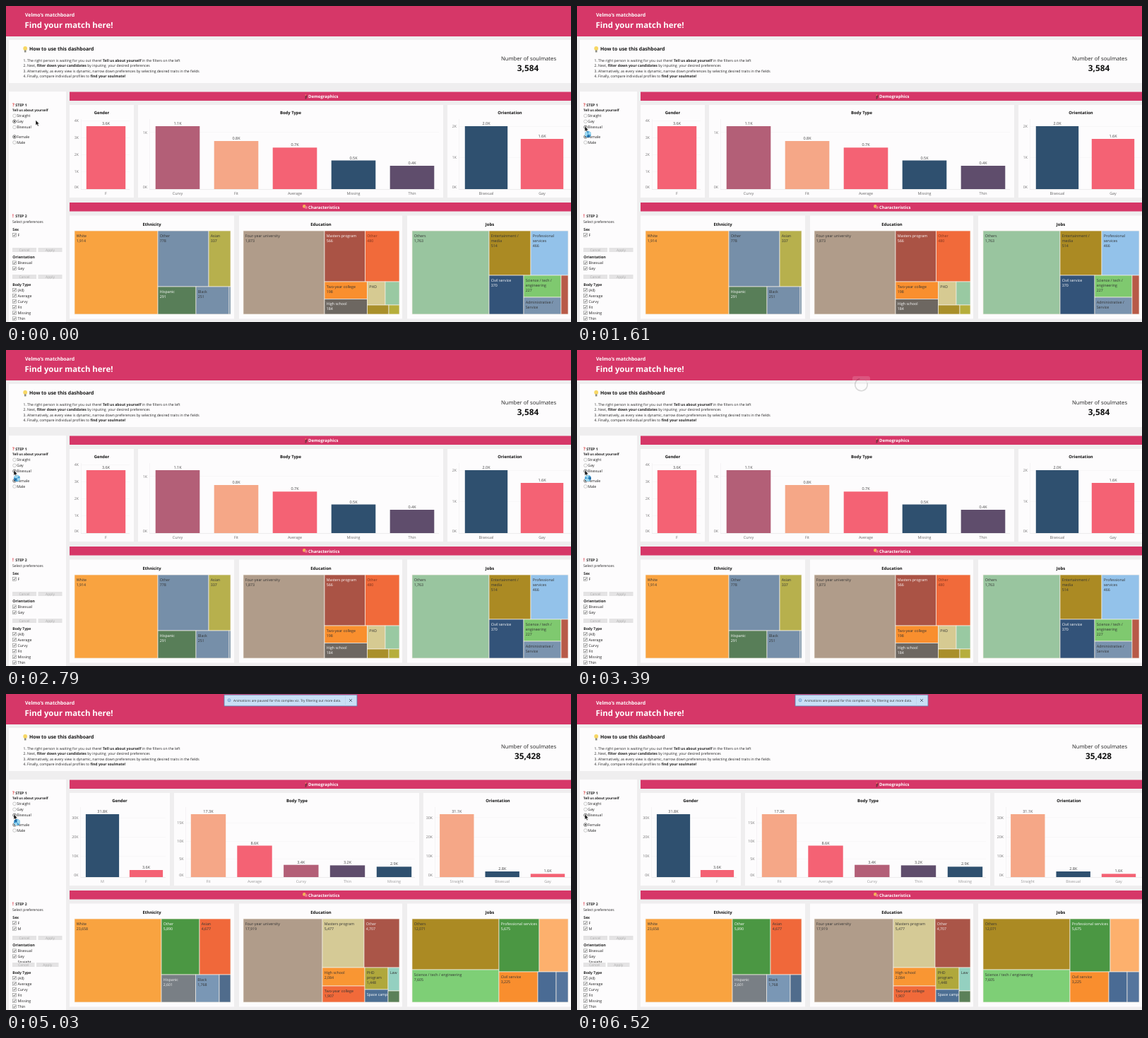
Animation of 800x447 px, one loop 6550 ms. Source, as an HTML page:

```html
<!DOCTYPE html>
<html lang="en">
<head>
<meta charset="utf-8">
<title>Match dashboard</title>
<style>
  html, body { margin: 0; width: 100%; height: 100%; overflow: hidden; background: #eee; }
  svg { display: block; width: 100vw; height: 100vh; }
  text { font-family: "Open Sans", "Noto Sans", sans-serif; text-rendering: geometricPrecision; white-space: pre; }
</style>
</head>
<body>
<svg id="stage" viewBox="0 0 800 447" preserveAspectRatio="none"></svg>
<script>
const LOOP = 6550;
const PINK = '#d63768', PANEL = '#fdfcfd', INK = '#222', GREY = '#666';
const NAVY = '#2f506f', CORAL = '#f46274', PEACH = '#f5a787', MAUVE = '#b35f77', PLUM = '#5f4d6c';

const rect = (x, y, w, h, fill, more = '') =>
  `<rect x="${x}" y="${y}" width="${w}" height="${h}" fill="${fill}" ${more}/>`;
const box = (l, t, r, b, fill, more) => rect(l, t, r - l, b - t, fill, more);
const text = (x, y, s, size, fill = INK, more = '') =>
  `<text x="${x}" y="${y}" font-size="${size}" fill="${fill}" ${more}>${s}</text>`;
const BOLD = 'font-weight="700"', MID = 'text-anchor="middle"', END = 'text-anchor="end"';
const strong = s => `<tspan font-weight="700">${s}</tspan>`;
const group = (id, body, more = '') => `<g id="${id}" ${more}>${body}</g>`;
const title = (x, y, s) => text(x, y, s, 5.9, '#111', `${BOLD} ${MID}`);

// Bars: [centre, top, colour, name, value]; ticks: [y, label]
function barChart(c) {
  let s = box(c.left, 140, c.right, 271, PANEL) + title(c.mid, 152.5, c.name);
  s += box(c.axis + 3, 160, c.axis + 3.5, 259, '#eceaec');
  for (const [y, label] of c.ticks) {
    if (label !== '0K') s += box(c.axis + 3, y, c.right - 6, y + 0.4, '#f0eef0');
    s += text(c.axis, y + 2, label, 5.3, '#777', END);
  }
  s += box(c.axis + 3, 259, c.right - 6, 259.5, '#dddadd');
  for (const [x, top, fill, name, value] of c.bars) {
    s += box(x - c.half, top, x + c.half, 259, fill);
    s += text(x, top - 2, value, 5.5, '#444', MID);
    s += text(x, 267, name, 5.4, c.label, MID);
  }
  return s;
}

// Cells: [left, top, right, bottom, colour, lines, text colour]
function treemap(cells) {
  return cells.map(([l, t, r, b, fill, lines = '', ink = '#333']) =>
    box(l, t, r, b, fill, 'stroke="#f3eee6" stroke-width=".7"') +
    lines.split('|').map((s, i) => text(l + 2.7, t + 8.6 + i * 7, s, 5.3, ink)).join('')
  ).join('');
}

const radio = (y, name) =>
  `<circle cx="12" cy="${y}" r="2.3" fill="#fff" stroke="#aaa" stroke-width=".6"/>` + text(15.3, y + 2, name, 5.3);
const dot = (id, y) =>
  `<g id="${id}"><circle cx="12" cy="${y}" r="2.3" fill="#fff" stroke="#555" stroke-width=".7"/><circle cx="12" cy="${y}" r="1.1" fill="#333"/></g>`;
const check = (y, name) =>
  rect(9.5, y - 2.4, 4.8, 4.8, '#fff', 'stroke="#888" stroke-width=".6"') +
  `<path d="M10.5 ${y}l1.1 1.2 1.9-2.5" fill="none" stroke="#333" stroke-width=".8"/>` +
  text(16.5, y + 2, name, 5.3);
const buttons = (y, w) => ['Cancel', 'Apply'].map((s, i) => {
  const x = 9 + i * (w + 2.5);
  return rect(x, y - 3, w, 6, '#e4e3e4') + text(x + w / 2, y + 1.7, s, 4.9, '#aaa', MID);
}).join('');
const band = (y, s) => box(90, y, 800, y + 12.5, PINK) + text(428, y + 8.7, s, 5.95, '#fff', BOLD);

function frame() {
  let s = rect(0, 0, 800, 447, '#efeeef') + rect(0, 0, 800, 43, PINK);
  s += text(27, 15.3, 'Velmo’s matchboard', 6.9, '#fff', BOLD);
  s += text(26.5, 31, 'Find your match here!', 11.4, '#fff', BOLD);

  s += box(4, 48, 800, 109, PANEL);
  s += '<circle cx="27.2" cy="60" r="2.9" fill="#f7d764"/>' + rect(26, 62.5, 2.5, 3, '#8b8b82');
  s += text(33, 63.4, 'How to use this dashboard', 6.9, '#111', BOLD);
  [
    `1. The right person is waiting for you out there! ${strong('Tell us about yourself')} in the filters on the left`,
    `2. Next, ${strong('filter down your candidates')} by inputing  your desired preferences`,
    '3. Alternatively, as every view is dynamic, narrow down preferences by selecting desired traits in the fields',
    `4. Finally, compare individual profiles to ${strong('find your soulmate!')}`
  ].forEach((line, i) => { s += text(24.5, 79 + i * 7.25, line, 5.1); });
  s += text(740, 76.5, 'Number of soulmates', 7.7, INK, MID);

  s += box(4, 121, 85, 447, PANEL);
  s += text(9, 142, '?', 6.2, '#d93636', BOLD) + text(13.3, 142, 'STEP 1', 5.2, INK, BOLD);
  s += text(9, 149, 'Tell us about yourself', 4.75, INK, BOLD);
  s += radio(155.3, 'Straight') + radio(163.3, 'Gay') + radio(171.4, 'Bisexual');
  s += radio(185, 'Female') + radio(193, 'Male');
  s += dot('gay', 163.3) + dot('bi', 171.4) + dot('female', 185);
  s += text(9, 299.3, '!', 6.4, '#d92d3d', BOLD) + text(13.3, 299.3, 'STEP 2', 5.2, INK, BOLD);
  s += text(9, 307, 'Select preferences', 5.1);
  s += text(9.3, 318, 'Sex', 5.2, INK, BOLD) + check(324, 'F');
  s += text(9.3, 357, 'Orientation', 5.4, INK, BOLD) + check(363.3, 'Bisexual') + check(371.3, 'Gay');
  s += text(9.3, 395.8, 'Body Type', 5.1, INK, BOLD);
  ['(All)', 'Average', 'Curvy', 'Fit', 'Missing', 'Thin'].forEach((n, i) => { s += check(401.7 + i * 8.1, n); });

  s += band(121.5, 'Demographics') + band(278, 'Characteristics');
  s += '<path d="M424 125l2.5 2-1.3 4.5h-1.8z" fill="#7b3040"/>' + rect(423.6, 125, 1.5, 2, '#ef6d60');
  s += '<circle cx="422.3" cy="283.4" r="2.3" fill="#f5b456"/><circle cx="425" cy="285" r="2" fill="#ef7590"/>';
  [[90, 323, 206.5, 'Ethnicity'], [330, 561, 446, 'Education'], [568, 800, 685, 'Jobs']]
    .forEach(([l, r, x, n]) => { s += box(l, 296.5, r, 442.5, PANEL) + title(x, 310.8, n); });
  return s;
}

const before = () =>
  text(739, 91.5, '3,584', 11.8, '#111', `${BOLD} ${MID}`) +
  buttons(345, 34) + buttons(383, 34) +
  barChart({ name: 'Gender', left: 90, right: 181, mid: 135.5, axis: 103, half: 27.7, label: GREY,
    ticks: [[162, '4K'], [186, '3K'], [210, '2K'], [234, '1K'], [256, '0K']],
    bars: [[141.5, 170, CORAL, 'F', '3.6K']] }) +
  barChart({ name: 'Body Type', left: 187, right: 619, mid: 403, axis: 200, half: 31.3, label: GREY,
    ticks: [[178.5, '1K'], [256, '0K']],
    bars: [[243, 170, MAUVE, 'Curvy', '1.1K'], [326, 191, PEACH, 'Fit', '0.8K'], [409, 200.3, CORAL, 'Average', '0.7K'],
      [492, 218.5, NAVY, 'Missing', '0.5K'], [575, 226, PLUM, 'Thin', '0.4K']] }) +
  barChart({ name: 'Orientation', left: 625, right: 806, mid: 713.5, axis: 638, half: 30.2, label: GREY,
    ticks: [[170, '2K'], [214, '1K'], [256, '0K']],
    bars: [[680, 170, NAVY, 'Bisexual', '2.0K'], [759, 188, CORAL, 'Gay', '1.6K']] }) +
  treemap([
    [97, 318, 215, 436, '#f9a340', 'White|1,914'],
    [215, 318, 287, 397, '#768fa9', 'Other|778'],
    [287, 318, 318, 397, '#b7b04d', 'Asian|337'],
    [215, 397, 269, 436, '#587e58', 'Hispanic|291', '#fff'],
    [269, 397, 316, 436, '#768fa9', 'Black|251'],
    [316, 397, 318, 436, '#5f80a0'],
    [336, 318, 451, 436, '#b09c8a', 'Four-year university|1,873'],
    [451, 318, 508.5, 390, '#aa5345', 'Masters program|566', '#fff'],
    [508.5, 318, 557, 390, '#f16a3a', 'Other|480', '#7c3520'],
    [451, 390, 511.5, 414.5, '#f98f2e', 'Two-year college|198'],
    [451, 414.5, 511.5, 436, '#6d6761', 'High school|184', '#fff'],
    [511.5, 390, 537, 423, '#d6ca92', 'PHD'],
    [537, 390, 557, 423, '#99c9a2'],
    [511.5, 423, 542, 436, '#a98f2b'],
    [542, 423, 557, 436, '#b6ae3c'],
    [575, 318, 684, 436, '#99c59f', 'Others|1,763'],
    [684, 318, 743, 381, '#ab8a23', 'Entertainment /|media|514'],
    [743, 318, 796, 381, '#93c2ea', 'Professional|services|466'],
    [684, 381, 733, 436, '#335379', 'Civil service|370', '#fff'],
    [733, 381, 786, 412, '#7fc96f', 'Science / tech /|engineering|227'],
    [733, 412, 786, 436, '#7a93ae', 'Administrative /|Service'],
    [786, 381, 796, 436, '#b85a48']
  ]);

const after = () =>
  text(738.5, 91.5, '35,428', 11.8, '#111', `${BOLD} ${MID}`) +
  check(332, 'M') + buttons(345, 34) +
  text(16.5, 381.3, 'Straight', 5.3) + rect(9, 380, 71, 7, PANEL) + buttons(383, 31.5) +
  barChart({ name: 'Gender', left: 90, right: 232, mid: 161, axis: 102.5, half: 23.6, label: '#999',
    ticks: [[175, '30K'], [202, '20K'], [229, '10K'], [256, '0K']],
    bars: [[136.5, 170, NAVY, 'M', '31.8K'], [198.5, 249, CORAL, 'F', '3.6K']] }) +
  barChart({ name: 'Body Type', left: 238, right: 585, mid: 412, axis: 251.5, half: 24.7, label: '#999',
    ticks: [[182, '15K'], [208, '10K'], [233, '5K'], [256, '0K']],
    bars: [[286.5, 170, PEACH, 'Fit', '17.3K'], [352, 214.5, CORAL, 'Average', '8.6K'], [417.8, 241.7, MAUVE, 'Curvy', '3.4K'],
      [483.5, 242.4, PLUM, 'Thin', '3.2K'], [549.5, 244.3, NAVY, 'Missing', '2.9K']] }) +
  barChart({ name: 'Orientation', left: 591, right: 806, mid: 696.5, axis: 604, half: 24.2, label: '#999',
    ticks: [[174.5, '30K'], [202, '20K'], [229, '10K'], [256, '0K']],
    bars: [[638.3, 170, PEACH, 'Straight', '31.1K'], [702.7, 251, NAVY, 'Bisexual', '2.8K'], [767, 254.4, CORAL, 'Gay', '1.6K']] }) +
  treemap([
    [97, 318, 220, 436, '#f9a340', 'White|23,658'],
    [220, 318, 274, 397, '#4b9743', 'Other|5,890', '#fff'],
    [274, 318, 318, 397, '#f0683a', 'Asian|4,677'],
    [220, 397, 268.5, 436, '#797f85', 'Hispanic|2,601', '#eee'],
    [268.5, 397, 302, 436, '#7a97b5', 'Black|1,768'],
    [302, 397, 318, 436, '#506c8c'],
    [336, 318, 448, 436, '#b09c8a', 'Four-year university|17,919'],
    [448, 318, 507, 387, '#d5ca96', 'Masters program|5,477'],
    [507, 318, 557, 387, '#aa5548', 'Other|4,707', '#eee'],
    [448, 387, 508, 413, '#f99633', 'High school|2,084'],
    [448, 413, 508, 436, '#f16a3a', 'Two-year college|1,907'],
    [508, 387, 541, 418, '#b0a83c', 'PHD|program|1,448'],
    [541, 387, 557, 420, '#94d0c0', 'Law'],
    [508, 418, 541, 436, '#4d6f93', 'Space camp', '#fff'],
    [541, 420, 557, 436, '#5b8059'],
    [575, 318, 698, 390, '#ab8a23', 'Others|12,071'],
    [575, 390, 698, 436, '#7ecf76', 'Science / tech / engineering|7,605'],
    [698, 318, 755, 393, '#4b9743', 'Professional services|5,675', '#fff'],
    [755, 318, 796, 393, '#fdb06d'],
    [698, 393, 753, 436, '#f98e2e', 'Civil service|3,225'],
    [753, 393, 779, 436, '#4a6b94'],
    [779, 393, 796, 436, '#55759d']
  ]);

const notice = () =>
  box(309, 1.2, 497, 17, '#c9dff6', 'stroke="#5b7fb0" stroke-width=".8"') +
  '<circle cx="316" cy="8.8" r="2" fill="none" stroke="#3c78bd" stroke-width=".6"/>' + rect(315.7, 8.3, .6, 1.6, '#3c78bd') +
  text(322, 10.5, 'Animations are paused for this complex viz. Try filtering out more data.', 4.63, '#333') +
  rect(480, 3, .5, 12, '#b3cae3') +
  '<path d="M486 7l4 4m0-4l-4 4" stroke="#345" stroke-width=".7"/>';

const loader = () =>
  rect(390, 37, 25, 25, '#fff', 'rx="3" opacity=".62"') +
  '<circle cx="402.5" cy="49" r="8.8" fill="none" stroke="#c9c9c9" stroke-width="1.6"/>' +
  '<path id="arc" d="M402.5 40.2a8.8 8.8 0 1 1-8.8 8.8" fill="none" stroke="#6e6e6e" stroke-width="1.6"/>';

const pointer = () =>
  '<path d="M0 0v7.2l1.7-1.5 1.3 2.8 1.3-.6-1.3-2.7h2.3z" fill="#111" stroke="#fff" stroke-width=".5"/>' +
  group('busy', '<circle cx="4.5" cy="11.3" r="4.5" fill="#3f9bd3"/>' +
    group('swirl', '<path d="M4.5 11.3V6.8a4.5 4.5 0 0 1 3.9 6.7zM4.5 11.3l-3.9 2.2a4.5 4.5 0 0 0 5.6 2z" fill="#9fd8ef"/>' +
      '<path d="M4.5 11.3L.1 10.3a4.5 4.5 0 0 1 2.4-3z" fill="#23669f"/>'));

document.getElementById('stage').innerHTML = frame() +
  group('before', before()) + group('after', after()) +
  group('loader', loader()) + group('notice', notice()) + group('cursor', pointer());

const el = Object.fromEntries([...document.querySelectorAll('[id]')].map(n => [n.id, n]));
const show = (name, on) => el[name].setAttribute('visibility', on ? 'inherit' : 'hidden');
const part = (t, from, to) => Math.min(1, Math.max(0, (t - from) / (to - from)));
const ease = p => p * p * (3 - 2 * p);

const CLICK = 940, LOAD = 3270, NOTICE = 3480, SWAP = 4600, REST = 5600;

function draw(t) {
  const p = ease(part(t, 30, 640));
  el.cursor.setAttribute('transform', `translate(${42 - 31 * p} ${161.5 + 8.7 * p})`);
  show('gay', t < CLICK);
  show('bi', t >= CLICK);
  show('busy', t >= CLICK && t < REST);
  el.swirl.setAttribute('transform', `rotate(${t * 0.36} 4.5 11.3)`);
  show('before', t < SWAP);
  show('after', t >= SWAP);
  show('loader', t >= LOAD && t < SWAP);
  el.loader.setAttribute('opacity', part(t, LOAD, LOAD + 500));
  el.arc.setAttribute('transform', `rotate(${(t - 4180) * 0.36} 402.5 49)`);
  show('notice', t >= NOTICE);
  el.notice.setAttribute('opacity', part(t, NOTICE, NOTICE + 100));
}

const start = performance.now();
function tick() {
  draw((performance.now() - start) % LOOP);
  requestAnimationFrame(tick);
}
tick();
</script>
</body>
</html>
```
